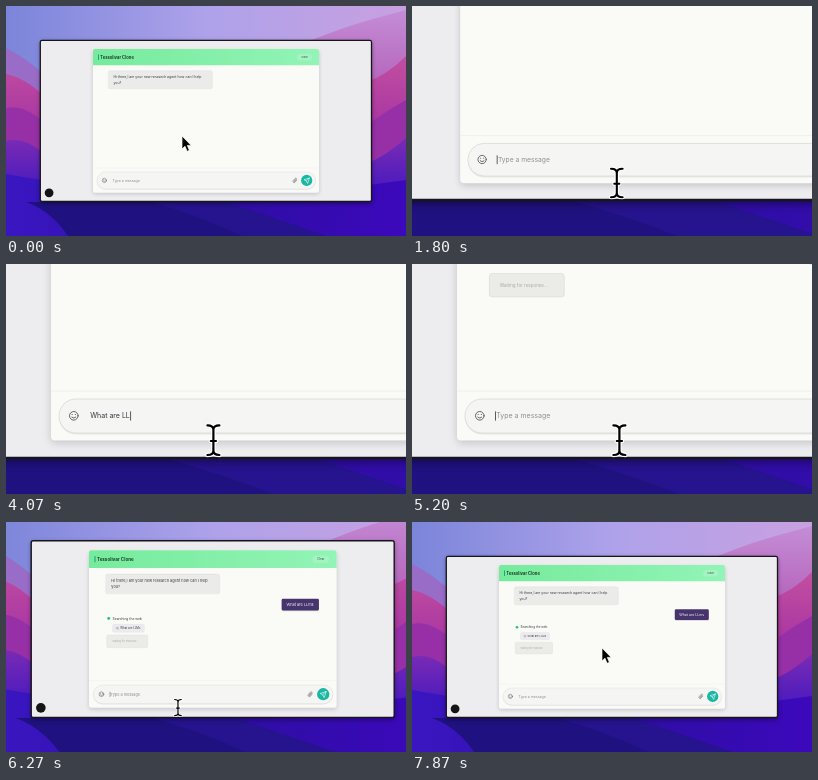
An HTML page that plays this animation: 400 px wide and 230 px high, repeating every 8000 ms.

```html
<!DOCTYPE html>
<html lang="en">
<head>
<meta charset="utf-8">
<title>Chat demo</title>
<style>
html, body { margin: 0; width: 100%; height: 100%; overflow: hidden; background: #1f1280; }
svg { display: block; width: 100vw; height: 100vh; }
text { font-family: Inter, "Liberation Sans", sans-serif; font-size: 3.5px; fill: #3a3d44; white-space: pre; }
.line { fill: none; stroke: #555; stroke-width: .45; stroke-linecap: round; stroke-linejoin: round; }
</style>
</head>
<body>
<svg viewBox="0 0 400 230" preserveAspectRatio="none">
  <defs>
    <linearGradient id="sky"><stop stop-color="#7b85da"/><stop offset=".5" stop-color="#aea2ea"/><stop offset="1" stop-color="#c8a0e0"/></linearGradient>
    <linearGradient id="mauve" x2="0" y2="1"><stop stop-color="#c48dd6"/><stop offset=".4" stop-color="#b25cb6"/></linearGradient>
    <linearGradient id="pink" x2="0" y2="1"><stop stop-color="#c34f9f"/><stop offset=".5" stop-color="#a02fa4"/></linearGradient>
    <linearGradient id="violet" x2="0" y2="1"><stop stop-color="#7a2bb4"/><stop offset=".6" stop-color="#4218c0"/></linearGradient>
    <linearGradient id="deep"><stop stop-color="#3a16c2"/><stop offset=".5" stop-color="#2c0fa0"/><stop offset="1" stop-color="#3c08bc"/></linearGradient>
    <linearGradient id="mint"><stop stop-color="#76eb9c"/><stop offset="1" stop-color="#92f4b6"/></linearGradient>
    <filter id="soft" x="-10%" y="-10%" width="120%" height="125%"><feGaussianBlur stdDeviation="2"/></filter>
  </defs>
  <g id="camera">
    <rect width="400" height="230" fill="url(#sky)"/>
    <path fill="url(#mauve)" d="M296 38Q335 22 360 15T400 4V230H296Z"/>
    <path fill="#996cc8" d="M0 42Q20 52 40 70V230H0Z"/>
    <path fill="url(#pink)" d="M0 68Q20 72 40 92V230H0ZM400 50Q380 70 360 76V230H400Z"/>
    <path fill="#9730a6" d="M0 102Q18 98 40 118V230H0ZM400 94Q380 105 360 120V230H400Z"/>
    <path fill="url(#violet)" d="M0 135Q20 130 40 150V230H0ZM400 132Q380 150 360 158V230H400Z"/>
    <path fill="url(#deep)" d="M0 168Q200 205 400 174V230H0Z"/>
    <path fill="#1f1280" d="M20 196H219Q264 211 320 230H62Q45 205 20 196Z"/>
    <path fill="#26138e" d="M145 196H219Q264 211 320 230H236Q190 208 145 196Z"/>

    <rect x="34" y="35" width="332" height="163" rx="3" fill="#000" opacity=".35" filter="url(#soft)"/>
    <rect x="34.3" y="34.3" width="331.2" height="161.2" rx="1.8" fill="#ededef" stroke="#17151c" stroke-width="1.3"/>
    <circle cx="43.1" cy="186.8" r="4.4" fill="#151515"/>

    <rect x="87" y="45" width="226" height="143" rx="2" fill="#667" opacity=".3" filter="url(#soft)"/>
    <rect x="87" y="43" width="226" height="143.7" rx="2" fill="#fafaf7"/>
    <path fill="url(#mint)" d="M87 59.3V45Q87 43 89 43H311Q313 43 313 45V59.3Z"/>
    <rect x="92" y="48.3" width="1" height="5.8" rx=".5" fill="#12a87e"/>
    <text x="94.3" y="52.8" style="font-size:4.2px;font-weight:600;fill:#16291f">Tessolivar Clone</text>
    <rect x="291" y="48" width="15" height="6.6" rx="3.3" fill="#a5f3c2"/>
    <text x="298.5" y="52.2" text-anchor="middle" style="font-size:2.6px;fill:#24563c">Clear</text>

    <rect x="102.3" y="64.8" width="104" height="18" rx="1.6" fill="#ebebea" stroke="#dfdfde" stroke-width=".4"/>
    <text x="107.4" y="72">Hi there,I am your new research agent how can I help</text>
    <text x="107.4" y="77.5">you?</text>

    <g id="question">
      <rect x="262.8" y="88" width="34" height="10.8" rx="1.3" fill="#000" opacity=".15"/>
      <rect x="262.8" y="87.2" width="34" height="10.8" rx="1.3" fill="#47346c"/>
      <text x="267.3" y="93.9" style="fill:#f3f0fa">What are LLms</text>
    </g>
    <g id="search">
      <circle cx="105" cy="105.2" r="1.3" fill="#1fbf86"/>
      <text x="108.5" y="106.4" style="font-size:3.05px">Searching the web</text>
      <rect x="108.5" y="110.6" width="29" height="7.2" rx="1.4" fill="#ecebee" stroke="#dddce2" stroke-width=".3"/>
      <g class="line" style="stroke:#8b7ba8;stroke-width:.35"><circle cx="112.6" cy="114" r=".85"/><path d="M113.3 114.7l.7.7"/></g>
      <text x="115.6" y="115.2" style="font-size:2.6px">What are LLMs</text>
    </g>
    <g id="waiting">
      <rect x="103.2" y="120.3" width="37.4" height="11.6" rx="1.3" fill="#ebebe8" stroke="#dededb" stroke-width=".4"/>
      <text x="108.4" y="127" style="font-size:2.25px;fill:#a9aaa8">Waiting for response...</text>
    </g>

    <path d="M87 162H313" stroke="#efefed" stroke-width=".5"/>
    <rect x="91" y="166.8" width="218.6" height="17" rx="8.5" fill="#000" opacity=".08"/>
    <rect x="91" y="166" width="218.6" height="17" rx="8.5" fill="#f5f5f4" stroke="#dededd" stroke-width=".5"/>
    <g class="line"><circle cx="98.4" cy="174.4" r="2.15"/><path d="M97.4 175.1q1 1 2 0M97.6 173.7v.1M99.2 173.7v.1"/></g>
    <text id="entry" x="106.6" y="175.7"></text>
    <rect id="caret" y="172.2" width=".4" height="4.6" fill="#333"/>
    <path class="line" transform="translate(289 174.4) rotate(40)" d="M1.2-1.2V1.3A1.2 1.2 0 0 1-1.2 1.3V-1.6A.8 .8 0 0 1 .4-1.6V1.1A.4 .4 0 0 1-.4 1.1V-1"/>
    <circle cx="300.7" cy="174.4" r="5.6" fill="#18b8a2"/>
    <path class="line" style="stroke:#fff;stroke-width:.55" d="M303.2 172l-5.2 1.7 2.2 1.2 1.2 2.2ZM303.2 172l-3 2.9"/>

    <g id="cursor">
      <path id="arrow" d="M0 0V13L3 10.2 5.1 15.3 7.4 14.3 5.3 9.4H9.2Z" fill="#000" stroke="#fff" stroke-width=".7"/>
      <g id="beam" fill="none" stroke-linecap="round">
        <path id="bar" d="M-3-7.4Q0-7.4 0-5.2Q0-7.4 3-7.4M0-5.2V5.2M-3 7.4Q0 7.4 0 5.2Q0 7.4 3 7.4M-1.3 .4H1.3" stroke="#fff" stroke-width="2.2"/>
        <use href="#bar" style="stroke:#000"/>
      </g>
    </g>
  </g>
</svg>
<script>
const LOOP = 8000, FOCUS = [129, 197];
const QUERY = "What are LLms";
const KEYS = [2330, 2470, 2600, 2740, 2870, 3000, 3130, 3270, 3530, 3800, 3930, 4270, 4470];
const SENT = 4730, FOUND = 5470;
const el = id => document.getElementById(id);
const show = (id, on) => el(id).style.display = on ? "" : "none";
const move = (id, value) => el(id).setAttribute("transform", value);
const mix = (a, b, k) => a + (b - a) * k;

// Soft start, long settle
const ease = (t, start) => 1 - Math.exp(-5 * Math.max(0, (t - start) / 1000) ** 1.9);

// The beam copy is the same path in a thinner black stroke
const copy = el("bar").cloneNode();
copy.removeAttribute("id");
copy.setAttribute("stroke", "#000");
copy.setAttribute("stroke-width", "1.1");
el("beam").replaceChild(copy, el("beam").querySelector("use"));

function drawEntry(t) {
  const typed = t < SENT ? QUERY.slice(0, KEYS.filter(k => k <= t).length) : "";
  const entry = el("entry");
  entry.textContent = typed || "Type a message";
  entry.style.fill = typed ? "#33363c" : "#8d8f94";
  show("caret", t > 1000 && t < 6400);
  el("caret").setAttribute("x", typed ? 106.8 + entry.getComputedTextLength() : 106);
}

function drawCursor(t) {
  let x, y;
  if (t < 4000) {
    const k = ease(t, 100);
    x = mix(176, 168.4, k);
    y = mix(130, 186.6, k);
  } else {
    x = mix(168.2, 190, ease(t, 6580));
    y = mix(186.6, 126, ease(t, 6430));
  }
  const typing = y > 174;
  show("beam", typing);
  show("arrow", !typing);
  move("cursor", `translate(${x} ${y})`);
}

function draw() {
  const t = performance.now() % LOOP;
  const zoom = 1 + ease(t, 1095) - ease(t, 5600);
  const [fx, fy] = FOCUS;
  move("camera", `translate(${fx} ${fy}) scale(${zoom}) translate(${-fx} ${-fy})`);
  show("question", t >= SENT);
  show("waiting", t >= SENT);
  show("search", t >= FOUND);
  move("waiting", `translate(0 ${t < FOUND ? -17 : 0})`);
  drawEntry(t);
  drawCursor(t);
  requestAnimationFrame(draw);
}
draw();
</script>
</body>
</html>
```
